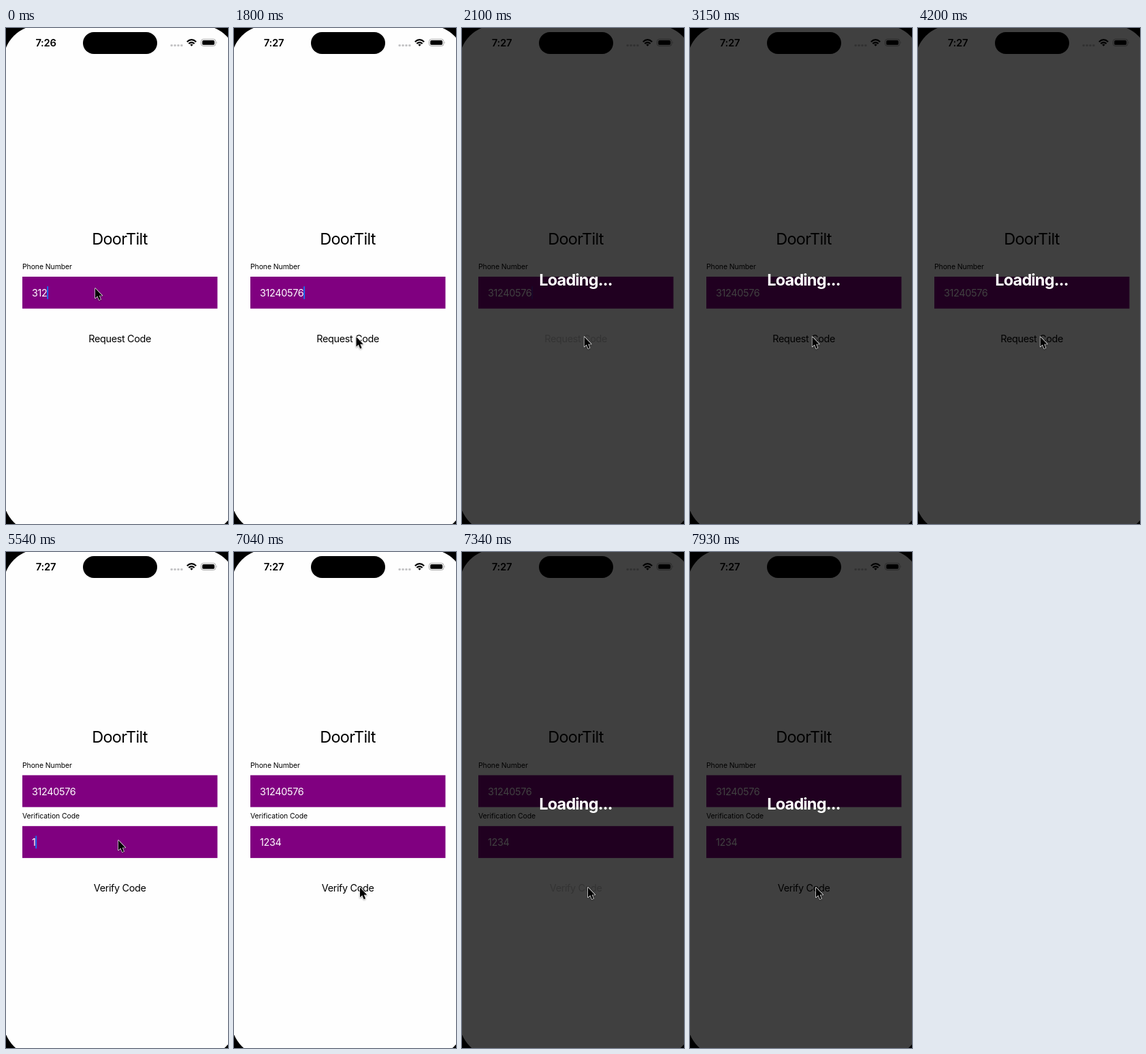
Animation of 326x726 px, one loop 8000 ms. Source, as an HTML page:

```html
<!DOCTYPE html>
<html lang="en">
<head>
<meta charset="utf-8">
<title>Phone sign-in</title>
<style>
  html, body { margin: 0; width: 100%; height: 100%; overflow: hidden; background: #000; }
  svg { display: block; width: 326px; height: 726px; font-family: Inter, Roboto, sans-serif; }
  .mid { text-anchor: middle; }
  .title { font-size: 23.5px; letter-spacing: -.7px; }
  .label { font-size: 10.4px; letter-spacing: -.05px; }
  .body { font-size: 14.4px; letter-spacing: -.33px; }
  .clock { font-size: 14.8px; font-weight: 600; letter-spacing: -.3px; }
  .loading { font-size: 23.5px; font-weight: 700; letter-spacing: -.85px; fill: #fff; }
  .field { fill: #800080; }
  .value { fill: #fff; }
  .hint { fill: rgba(60, 60, 67, .3); }
</style>
</head>
<body>
<svg viewBox="0 0 326 726">
  <rect width="326" height="726"/>
  <rect x="-4" y="-4" width="343" height="743" rx="53" fill="#fefefe"/>

  <text id="clock" class="clock mid" x="58.5" y="27"></text>
  <rect x="113" y="6" width="109" height="32" rx="16"/>
  <g fill="#c3c3c5">
    <rect x="241.5" y="24" width="3.4" height="3" rx="1.2"/>
    <rect x="246.4" y="24" width="3.4" height="3" rx="1.2"/>
    <rect x="251.3" y="24" width="3.4" height="3" rx="1.2"/>
    <rect x="256.2" y="24" width="3.4" height="3" rx="1.2"/>
  </g>
  <g fill="none" stroke="#000" stroke-width="2.1">
    <path d="M265.8 20.2Q272.5 14 279.2 20.2M268.3 22.9Q272.5 19.2 276.7 22.9"/>
    <path d="M270.3 24.3Q272.5 22.6 274.7 24.3L272.5 26.8Z" fill="#000" stroke="none"/>
  </g>
  <rect x="286.5" y="16.4" width="21.4" height="10" rx="3.2" fill="none" stroke="#a5a5a5"/>
  <rect x="288.2" y="18" width="18" height="6.8" rx="1.9"/>
  <path d="M309 19.8q1.4 1.6 0 3.2z" fill="#a5a5a5"/>

  <g id="upper">
    <text class="title mid" x="167" y="316.7">DoorTilt</text>
    <text class="label" x="24" y="353">Phone Number</text>
    <rect class="field" x="24" y="364" width="286.5" height="46.7"/>
    <text id="phone" class="body value" x="38" y="393"></text>
  </g>
  <g id="lower">
    <text class="label" x="24" y="389.8">Verification Code</text>
    <rect class="field" x="24" y="401.2" width="286.5" height="46.7"/>
    <text id="hint" class="body hint" x="38" y="430.2">Verification Code</text>
    <text id="code" class="body value" x="38" y="430.2"></text>
  </g>
  <rect id="caret" width="1.7" height="19" rx=".8" fill="#0a7aff"/>
  <text id="button" class="body mid" x="167.2"></text>

  <g id="overlay">
    <rect width="326" height="726" fill-opacity=".75"/>
    <text class="loading mid" x="167" y="376.6">Loading...</text>
  </g>
  <path id="pointer" d="M0 0V14.6L3.3 11.5L5.7 17.2L8.1 16.2L5.8 10.7H10.3Z"
    stroke="#fff" stroke-width="1.3" stroke-linejoin="round" paint-order="stroke"
    style="filter:drop-shadow(0 1px 1px rgba(0,0,0,.35))"/>
</svg>
<script>
const LOOP = 8000;
const PHONE = '31240576';
const CODE = '1234';

// Each row changes some values at its time; the rest carry over.
const steps = [
  [0, { clock: '7:26', phone: 3, code: 0, verify: false, loading: false, press: 1, caret: 1, at: [131, 381] }],
  [450, { phone: 4 }],
  [600, { phone: 5, clock: '7:27' }],
  [900, { phone: 6 }],
  [1200, { phone: 7 }],
  [1500, { phone: 8 }],
  [1650, { at: [165, 428] }],
  [1800, { at: [179.5, 452] }],
  [2100, { loading: true, press: .2, caret: .3 }],
  [2250, { press: .5, caret: 0 }],
  [2400, { press: 1 }],
  [2550, { caret: 1 }],
  [3150, { caret: 0 }],
  [3600, { caret: 1 }],
  [4200, { caret: 0 }],
  [4350, { loading: false, verify: true }],
  [4650, { at: [176, 444] }],
  [4800, { at: [169, 430] }],
  [4950, { at: [165, 422] }],
  [5100, { caret: .5 }],
  [5240, { caret: 1 }],
  [5540, { code: 1 }],
  [5840, { code: 2 }],
  [6140, { code: 3 }],
  [6440, { code: 4 }],
  [6590, { at: [170, 438] }],
  [6740, { at: [181, 472] }],
  [6890, { at: [185, 491] }],
  [7040, { caret: 0 }],
  [7340, { loading: true, press: .2 }],
  [7490, { press: .5, caret: 1 }],
  [7630, { press: 1 }],
  [7930, { caret: 0 }]
];

let carried = {};
const states = steps.map(([time, change]) => ({ time, ...(carried = { ...carried, ...change }) }));

const el = id => document.getElementById(id);
const set = (id, name, value) => el(id).setAttribute(name, value);
const show = (id, on) => set(id, 'visibility', on ? 'visible' : 'hidden');

function draw(s) {
  el('clock').textContent = s.clock;
  el('phone').textContent = PHONE.slice(0, s.phone);
  el('code').textContent = CODE.slice(0, s.code);
  show('lower', s.verify);
  set('lower', 'display', s.verify ? 'inline' : 'none');
  set('hint', 'display', s.code ? 'none' : 'inline');
  set('upper', 'transform', `translate(0 ${s.verify ? -37.3 : 0})`);

  const width = s.verify
    ? (s.code ? el('code').getComputedTextLength() : 0)
    : el('phone').getComputedTextLength();
  set('caret', 'x', 37.8 + width);
  set('caret', 'y', s.verify ? 415.2 : 378);
  set('caret', 'opacity', s.caret);

  el('button').textContent = s.verify ? 'Verify Code' : 'Request Code';
  set('button', 'y', s.verify ? 497.2 : 460);
  set('button', 'opacity', s.press);
  show('overlay', s.loading);
  set('pointer', 'transform', `translate(${s.at})`);
}

const start = performance.now();
let current;
function tick() {
  const time = (performance.now() - start) % LOOP;
  const state = states.findLast(s => s.time <= time);
  if (state !== current) draw(current = state);
  requestAnimationFrame(tick);
}
tick();
</script>
</body>
</html>
```
